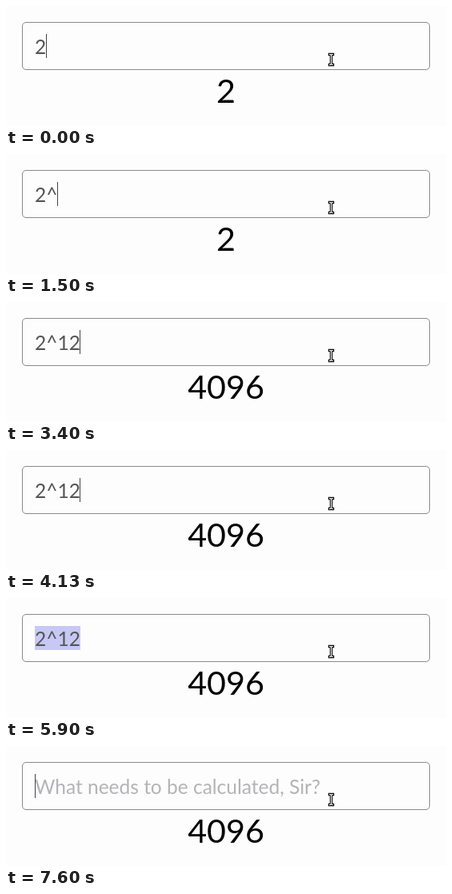
These frames come from a looping animation (550 by 150 pixels, 8000 ms). An HTML page:

```html
<!DOCTYPE html>
<html lang="en">
<head>
<meta charset="utf-8">
<title>Calculator field</title>
<style>
  html, body { margin: 0; width: 100%; height: 100%; overflow: hidden; background: #fdfdfd; }
  svg { display: block; width: 550px; height: 150px; }
  text { font-family: Lato, sans-serif; }
  .field { fill: none; stroke: #8a8a8a; }
  .entry { font-size: 24.5px; fill: #555; }
  .entry.hint { fill: #b4b4b8; }
  .result { font-size: 41.2px; fill: #000; text-anchor: middle; }
  .selection { fill: #c8c8f6; }
  .caret { fill: #444; }
  .pointer { fill: none; stroke: #000; stroke-width: 3.4; stroke-linecap: square; }
  .pointer + .pointer { stroke: #fff; stroke-width: 1.2; }
</style>
</head>
<body>
<svg viewBox="0 0 550 150">
  <rect class="field" x="20.5" y="20.5" width="509" height="59" rx="4.5"/>
  <rect class="selection" id="selection" x="36" y="35" width="57" height="30"/>
  <text class="entry" id="entry" x="36" y="60"></text>
  <rect class="caret" id="caret" y="35" width="1" height="30"/>
  <text class="result" id="result" x="275" y="121"></text>
  <path class="pointer" d="M404.5 60.5h1l1 1 1-1h1M406.5 61.5v11M404.5 73.5h1l1-1 1 1h1"/>
  <path class="pointer" d="M404.5 60.5h1l1 1 1-1h1M406.5 61.5v11M404.5 73.5h1l1-1 1 1h1"/>
</svg>
<script>
  const LOOP = 8000;
  const HINT = "What needs to be calculated, Sir?";
  const TEXT_LEFT = 36;
  const DIGIT_WIDTH = 14.21;
  const steps = [
    { at: 0, entry: "2", result: "2" },
    { at: 100, entry: "2^", result: "2" },
    { at: 1530, entry: "2^1", result: "2" },
    { at: 1650, entry: "2^10", result: "1024" },
    { at: 2400, entry: "2^1", result: "2" },
    { at: 3400, entry: "2^12", result: "4096" },
    { at: 5100, entry: "2^12", result: "4096", selected: true },
    { at: 6000, entry: "", result: "4096" }
  ];
  const [entry, result, caret, selection] =
    ["entry", "result", "caret", "selection"].map(id => document.getElementById(id));
  const show = (node, visible) => node.setAttribute("visibility", visible ? "visible" : "hidden");
  let current;

  function render(step) {
    entry.textContent = step.entry || HINT;
    entry.classList.toggle("hint", !step.entry);
    result.textContent = step.result;
    caret.setAttribute("x", Math.round(TEXT_LEFT - 0.5 + step.entry.length * DIGIT_WIDTH));
    show(caret, !step.selected);
    show(selection, step.selected);
  }

  const start = performance.now();
  function tick(now) {
    const time = Math.max(0, now - start) % LOOP;
    const step = steps.findLast(({ at }) => at <= time);
    if (step !== current) render(current = step);
    requestAnimationFrame(tick);
  }
  tick(start);
</script>
</body>
</html>
```
